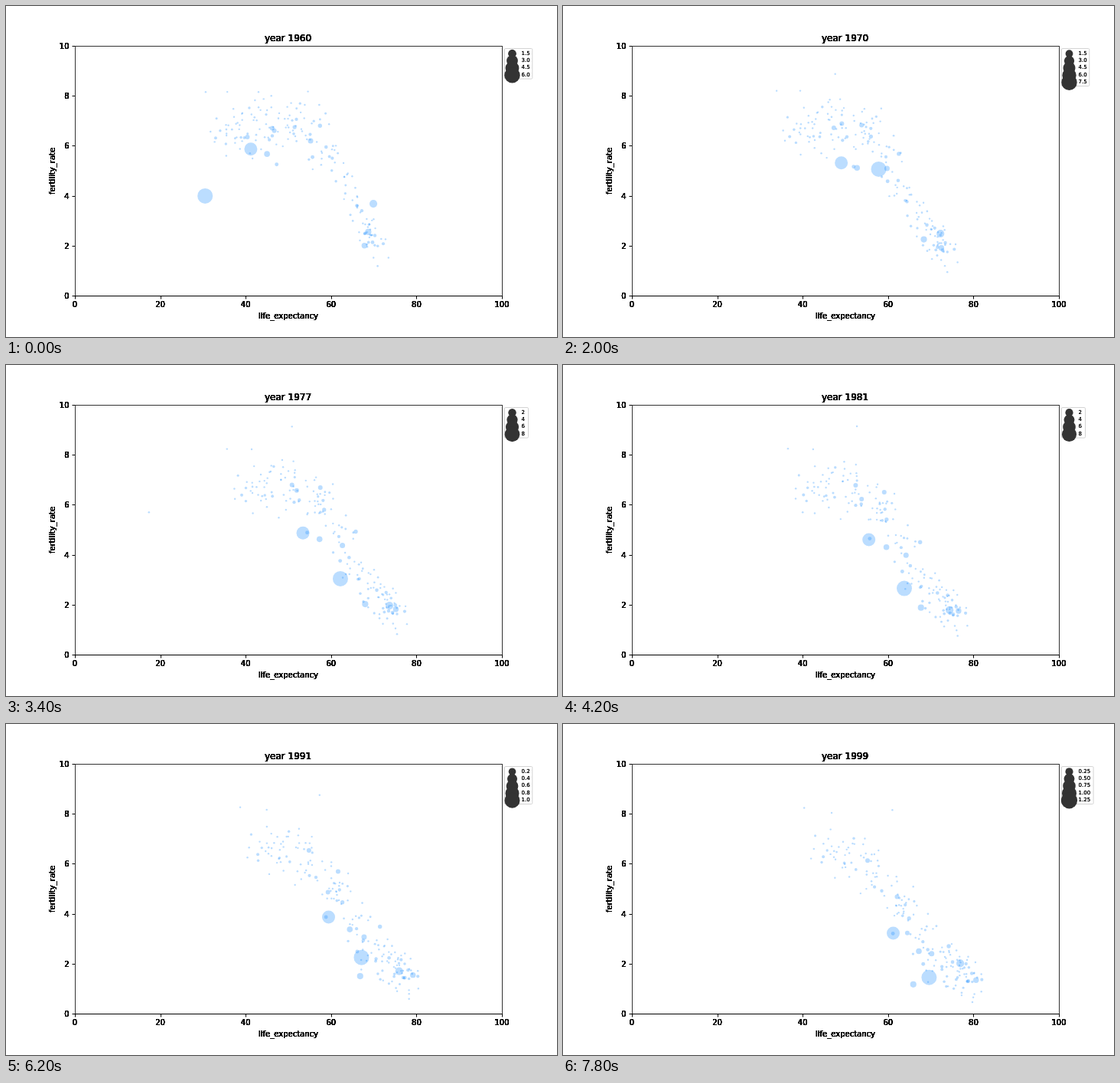
An HTML page with a canvas for the animation above (8 s loop, 720 px wide and 432 px high).

```html
<!DOCTYPE html>
<html lang="en">
<head>
<meta charset="utf-8">
<title>Fertility and life expectancy</title>
<style>
html, body { margin: 0; width: 100%; height: 100%; overflow: hidden; background: #fff; }
canvas { display: block; width: 720px; height: 432px; }
</style>
</head>
<body>
<canvas id="stage" width="720" height="432"></canvas>
<script>
const ctx = document.getElementById('stage').getContext('2d');
const LEFT = 90, TOP = 52, RIGHT = 648, BOTTOM = 378;
const FIRST = 1960, YEARS = 40, STEP = 200;
const FONT = '"DejaVu Sans", sans-serif';

const px = life => LEFT + (RIGHT - LEFT) * life / 100;
const py = rate => BOTTOM - (BOTTOM - TOP) * rate / 10;
const progress = year => (year - FIRST) / (YEARS - 1);

// Piecewise linear value at x.
function lerpAt(xs, ys, x) {
  let i = 1;
  while (i < xs.length - 1 && x > xs[i]) i++;
  return ys[i - 1] + (ys[i] - ys[i - 1]) * (x - xs[i - 1]) / (xs[i] - xs[i - 1]);
}

// Parabola through a at 0, b at MID and c at 1.
const MID = 7 / 13;
function bend(a, b, c, k) {
  const curve = (b - a - (c - a) * MID) / (MID * (MID - 1));
  return a + (c - a) * k + curve * k * (k - 1);
}

function seeded(seed) {
  return () => {
    seed = (seed + 0x6d2b79f5) | 0;
    let t = Math.imul(seed ^ (seed >>> 15), 1 | seed);
    t = (t + Math.imul(t ^ (t >>> 7), 61 | t)) ^ t;
    return ((t ^ (t >>> 14)) >>> 0) / 4294967296;
  };
}
const rand = seeded(1960);
const bell = () => rand() + rand() + rand() + rand() - 2;

// Every country: a radius and a rule giving [life expectancy, fertility rate].
const countries = [];
const add = (r, at) => countries.push({ r, at });

// Small countries share one falling S-curve that drifts and widens.
function fertility(life, k) {
  return 1.9 - .8 * k + (4.9 + k) / (1 + Math.exp((life - 64) / (2.6 + 3.4 * k)));
}

const CROWD = 170;
for (let i = 0; i < CROWD; i++) {
  const u = (i + rand()) / CROWD;
  const start = Math.min(34 + 42 * u ** 1.1, 70) + 3.4 * bell();
  const gain = (10 - 3 * u + 16 * u * (1 - u)) * (.85 + .3 * rand());
  const offset = bell() * (1.2 - .8 * u ** 3);
  add(1.2 + 1.5 * rand() ** 7, year => {
    const k = progress(year);
    const life = start + gain * k ** .8;
    return [life, fertility(life, k) + offset];
  });
}

// Short collapses of life expectancy, and one rate that peaks late
const dip = (depth, centre, width, year) => depth * Math.exp(-(((year - centre) / width) ** 2));
add(1.3, year => [41 + 14 * progress(year) - dip(30, 1977.3, 3.3, year), 5.7]);
add(1.2, year => [46 - dip(36, 1994, 1, year), 8 - progress(year)]);
add(1.2, year => [43 + 18 * progress(year), 8.15 + Math.sin(Math.PI * progress(year))]);

// Large countries: first, middle and last position
function large(r, a, b, c) {
  add(r, year => [0, 1].map(i => bend(a[i], b[i], c[i], progress(year))));
}
large(8.5, [41.2, 5.87], [55.5, 4.6], [61.2, 3.22]);
large(5.1, [69.9, 3.68], [74.4, 1.78], [76.9, 2.01]);
large(4.1, [68.7, 2.55], [67.7, 1.88], [65.9, 1.17]);
large(3.7, [67.8, 2], [76.5, 1.75], [80.6, 1.34]);
large(3.8, [45, 5.67], [59.6, 4.3], [67.2, 2.5]);
large(3.5, [55.2, 6.2], [64.2, 3.98], [70.2, 2.4]);
large(3, [46.7, 6.6], [59.1, 6.5], [62.1, 4.68]);
large(3, [40.4, 6.35], [52.4, 6.78], [55.2, 6.13]);
large(3, [46.2, 6.7], [53.8, 6.23], [64.5, 3.23]);
large(2.7, [57.4, 6.8], [67.5, 4.5], [74.2, 2.7]);

// The largest one starts in a famine and recovers within a few years.
const TURNS = [1960, 1961, 1963, 1966, 1978, 1990, 1999];
add(10, year => [
  lerpAt(TURNS, [30.5, 31.5, 50, 55.3, 62.8, 66.8, 69.6], year),
  lerpAt(TURNS, [3.99, 3.28, 7.2, 6.22, 2.75, 2.35, 1.45], year)
]);

function disc(x, y, r) {
  ctx.beginPath();
  ctx.arc(x, y, r, 0, Math.PI * 2);
  ctx.fill();
}

// Repeated drawing gives the heavy edge of stacked labels.
function label(text, x, y, size, align = 'center', times = 12) {
  ctx.font = size + 'px ' + FONT;
  ctx.textAlign = align;
  for (let i = 0; i < times; i++) ctx.fillText(text, x, y);
}

function drawAxes(year) {
  const width = RIGHT - LEFT, height = BOTTOM - TOP;
  ctx.fillStyle = 'rgba(0,0,0,.8)';
  ctx.fillRect(LEFT, TOP, 1, height);
  ctx.fillRect(RIGHT, TOP, 1, height);
  ctx.fillRect(LEFT + 1, TOP, width - 1, 1);
  ctx.fillStyle = '#000';
  ctx.fillRect(LEFT, BOTTOM, width + 1, 1);
  for (let i = 0; i <= 5; i++) {
    const x = px(i * 20), y = py(i * 2);
    ctx.fillRect(Math.round(x), BOTTOM + 1, 1, 3.5);
    ctx.fillRect(LEFT - 3.5, Math.round(y), 3.5, 1);
    label(String(i * 20), x, 393, 10);
    label(String(i * 2), 82.5, y + 4, 10, 'right');
  }
  label('life_expectancy', 369, 408, 10);
  label('year ' + year, 368.5, 46, 12);
  ctx.save();
  ctx.translate(64, 215.5);
  ctx.rotate(-Math.PI / 2);
  label('fertility_rate', 0, 0, 10);
  ctx.restore();
}

// Legend steps follow the largest population, in hundreds of millions.
function drawLegend(year) {
  const max = lerpAt([1960, 1966, 1974, 1982, 1999], [6.5, 7.35, 8.99, 10.09, 12.53], year);
  const [unit, scale, digits] = max < 9 ? [1.5, 1, 1]
    : max < 10 ? [2, 1, 0]
    : max < 12 ? [.2, 10, 1] : [.25, 10, 2];
  const count = Math.floor(max / scale / unit + 1e-6);
  ctx.fillStyle = 'rgba(255,255,255,.8)';
  ctx.strokeStyle = '#d4d4d4';
  ctx.lineWidth = 1;
  ctx.beginPath();
  ctx.roundRect(651.5, 55.5, 31 + 5.3 * digits, 2 + count * 9.4, 1.4);
  ctx.fill();
  ctx.stroke();
  for (let i = 1; i <= count; i++) {
    const y = 52.2 + i * 9.4;
    ctx.fillStyle = '#333';
    disc(661.5, y + .6, 10 * Math.sqrt(unit * i * scale / max) + .6);
    ctx.fillStyle = '#000';
    label((unit * i).toFixed(digits), 673.5, y + 2, 7, 'left', 2);
  }
}

function draw(year) {
  ctx.fillStyle = '#fff';
  ctx.fillRect(0, 0, 720, 432);
  ctx.save();
  ctx.beginPath();
  ctx.rect(LEFT, TOP, RIGHT - LEFT, BOTTOM - TOP);
  ctx.clip();
  ctx.fillStyle = 'rgba(30,144,255,.3)';
  for (const { r, at } of countries) {
    const [life, rate] = at(year);
    disc(px(life), py(rate), r);
  }
  ctx.restore();
  drawAxes(year);
  drawLegend(year);
}

const start = performance.now();
function tick() {
  const elapsed = Math.max(0, performance.now() - start);
  draw(FIRST + Math.floor(elapsed / STEP) % YEARS);
  requestAnimationFrame(tick);
}
tick();
</script>
</body>
</html>
```
